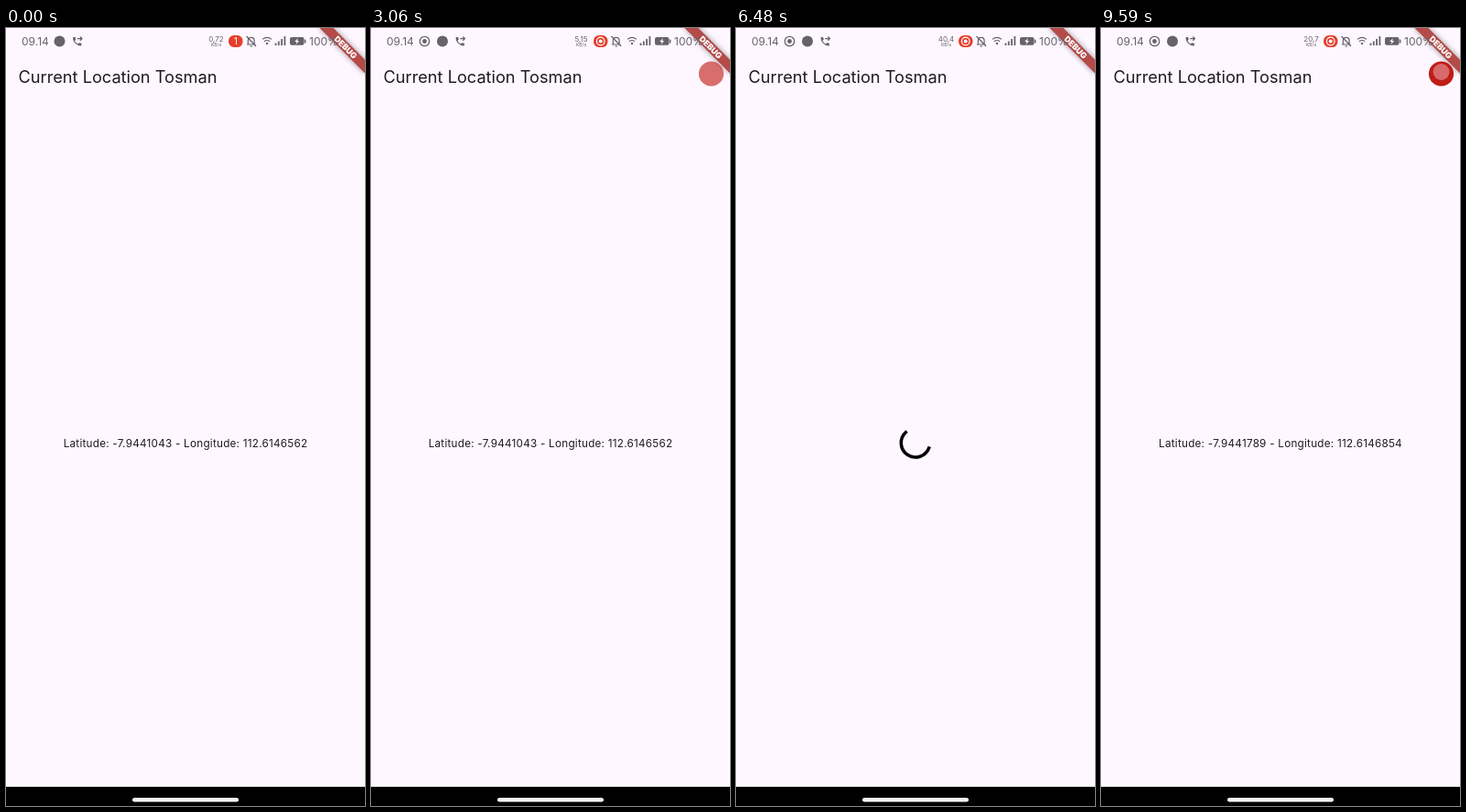
An HTML page for the animation above (9.62 s loop, 392x850 px).

```html
<!DOCTYPE html>
<html lang="en">
<head>
<meta charset="utf-8">
<title>Current location</title>
<style>
html, body { margin: 0; width: 100%; height: 100%; overflow: hidden; background: #fef7ff; }
svg { display: block; width: 392px; height: 850px; font-family: Inter, Roboto, sans-serif; }
.status { fill: #66626a; }
.line { fill: none; stroke: #66626a; }
.mid { text-anchor: middle; }
</style>
</head>
<body>
<svg viewBox="0 0 392 850">
  <defs>
    <filter id="blur" x="-30%" y="-150%" width="160%" height="400%"><feGaussianBlur stdDeviation="3.2"/></filter>
  </defs>
  <rect width="392" height="850" fill="#fef7ff"/>

  <text x="13.5" y="60" font-size="18.2" fill="#1d1b20">Current Location Tosman</text>
  <text id="coords" class="mid" x="196" y="457.5" font-size="11.7" letter-spacing=".25" fill="#1d1b20"></text>
  <path id="spinner" fill="none" stroke="#000" stroke-width="3.5" stroke-linecap="square"/>

  <g transform="translate(392 0) rotate(45)">
    <rect x="-35" y="24.5" width="70" height="10.5" opacity=".4" filter="url(#blur)"/>
    <rect x="-36" y="24.5" width="72" height="10.5" fill="#b44b49"/>
    <text class="mid" y="33" font-size="8.9" font-weight="900" fill="#fff">DEBUG</text>
  </g>

  <g class="status">
    <text x="17" y="19" font-size="12">09.14</text>
    <g id="record">
      <circle class="line" cx="58.5" cy="14.5" r="5.2" stroke-width="1.3"/>
      <circle cx="58.5" cy="14.5" r="2.4"/>
    </g>
    <g id="notices">
      <circle cx="58.5" cy="14.5" r="6"/>
      <g transform="translate(71.5 8.5) scale(.52)">
        <path d="M20 15.5c-1.2 0-2.4-.2-3.6-.6-.3-.1-.7 0-1 .2l-2.2 2.2c-2.8-1.4-5.1-3.8-6.6-6.6l2.2-2.2c.3-.3.4-.7.2-1C8.7 6.4 8.5 5.2 8.5 4c0-.5-.5-1-1-1H4c-.5 0-1 .5-1 1 0 9.4 7.6 17 17 17 .6 0 1-.5 1-1v-3.5c0-.6-.4-1-1-1z"/>
        <path class="line" stroke-width="2.4" d="M12 6h10M18 2l4 4-4 4"/>
      </g>
    </g>
    <g class="mid">
      <text id="speed" x="229.5" y="15" font-size="8"></text>
      <text x="229.5" y="19.6" font-size="5">KB/s</text>
    </g>
    <rect x="243" y="8" width="15.5" height="13" rx="6" fill="#e63d2b"/>
    <text id="count" class="mid" x="250.7" y="18.2" font-size="10" fill="#fff">1</text>
    <g id="live">
      <circle cx="250.7" cy="14.5" r="4.3" fill="none" stroke="#fff" stroke-width="1.2"/>
      <circle cx="250.7" cy="14.5" r="2" fill="#fff"/>
    </g>
    <path class="line" stroke-width="1.2" d="M263 18h9.5M264.3 18v-4q0-3.6 3.4-3.6t3.4 3.6v4M266.5 20h2.5M262.5 9l10.5 11"/>
    <path class="line" stroke-width="1.1" d="M280 12.4q5-4 10 0M281.9 14.8q3.1-2.5 6.2 0"/>
    <circle cx="285" cy="17" r="1.2"/>
    <path class="line" stroke-width="1.8" d="M294.5 19v-2.5M297.8 19v-4.5M301.1 19v-7M304.4 19v-10"/>
    <rect x="310" y="10" width="15.5" height="8.8" rx="2"/>
    <rect x="326" y="12.5" width="1.4" height="4" rx=".6"/>
    <path d="M318.8 11l-3.6 4h2.2l-.8 3 3.6-4h-2.2z" fill="#fef7ff"/>
    <text x="331" y="19" font-size="12">100%</text>
  </g>

  <circle id="dot" cx="371.5" cy="50" r="13.6" fill="#c01c18"/>
  <circle id="core" cx="371.5" cy="48" fill="#d86a6c"/>

  <rect y="829" width="392" height="21"/>
  <rect x="138" y="841" width="116" height="4.4" rx="2.2" fill="#f6f2f6"/>
</svg>
<script>
const LOOP = 9620, RECORD = 500, LOAD = 4315, LOADED = 9000;
const $ = id => document.getElementById(id);
const show = (id, on) => $(id).style.display = on ? '' : 'none';
const clamp = x => Math.min(1, Math.max(0, x));

const speeds = [[0, '0,72'], [2850, '5,15'], [4900, '2,26'], [6000, '40,4'], [8000, '24,6'], [9000, '20,7']];

// phase, opacity
const pulse = [[0, 0], [0.05, 0], [0.28, 0.63], [0.35, 0.68], [0.36, 1], [0.55, 1], [0.734, 0.54], [0.94, 0], [1, 0]];

// cubic-bezier(.4, 0, .2, 1)
function ease(x) {
  let lo = 0, hi = 1;
  for (let i = 0; i < 22; i++) {
    const s = (lo + hi) / 2, r = 1 - s;
    if (1.2 * r * r * s + 0.6 * r * s * s + s * s * s < x) lo = s; else hi = s;
  }
  return lo * lo * (3 - 2 * lo);
}

function drawSpinner(t) {
  const p = t / 1333 % 1;
  const head = ease(clamp(p * 2)), tail = ease(clamp(p * 2 - 1));
  const start = Math.PI * (-0.5 + 1.5 * tail + 2 * (t / 2222) + 0.5 * p);
  const sweep = Math.max(1.5 * Math.PI * (head - tail), 0.004);
  const at = a => (196 + 15.7 * Math.cos(a)).toFixed(3) + ' ' + (453.3 + 15.7 * Math.sin(a)).toFixed(3);
  $('spinner').setAttribute('d',
    `M${at(start)}A15.7 15.7 0 ${+(sweep > Math.PI)} 1 ${at(start + sweep)}`);
}

function drawDot(t) {
  const p = (t + 1140) / 1280 % 1;
  const i = pulse.findIndex(k => k[0] > p);
  const [p0, a0] = pulse[i - 1], [p1, a1] = pulse[i];
  $('dot').setAttribute('opacity', a0 + (a1 - a0) * (p - p0) / (p1 - p0));
  show('dot', t > 140);
  const closing = p > 0.35 && p < 0.41;
  $('core').setAttribute('r', closing ? 13.5 * Math.sqrt((0.41 - p) / 0.06) : 0);
}

function draw(t) {
  const recording = t >= RECORD, loading = t >= LOAD && t < LOADED;
  show('record', recording);
  show('live', recording);
  show('count', !recording);
  $('notices').setAttribute('transform', `translate(${recording ? 19.5 : 0} 0)`);
  $('speed').textContent = speeds.filter(s => s[0] <= t).pop()[1];
  $('coords').textContent = t < LOADED
    ? 'Latitude: -7.9441043 - Longitude: 112.6146562'
    : 'Latitude: -7.9441789 - Longitude: 112.6146854';
  show('coords', !loading);
  show('spinner', loading);
  if (loading) drawSpinner(t - LOAD);
  drawDot(t);
}

const begin = performance.now();
function tick() {
  draw((performance.now() - begin) % LOOP);
  requestAnimationFrame(tick);
}
tick();
</script>
</body>
</html>
```
